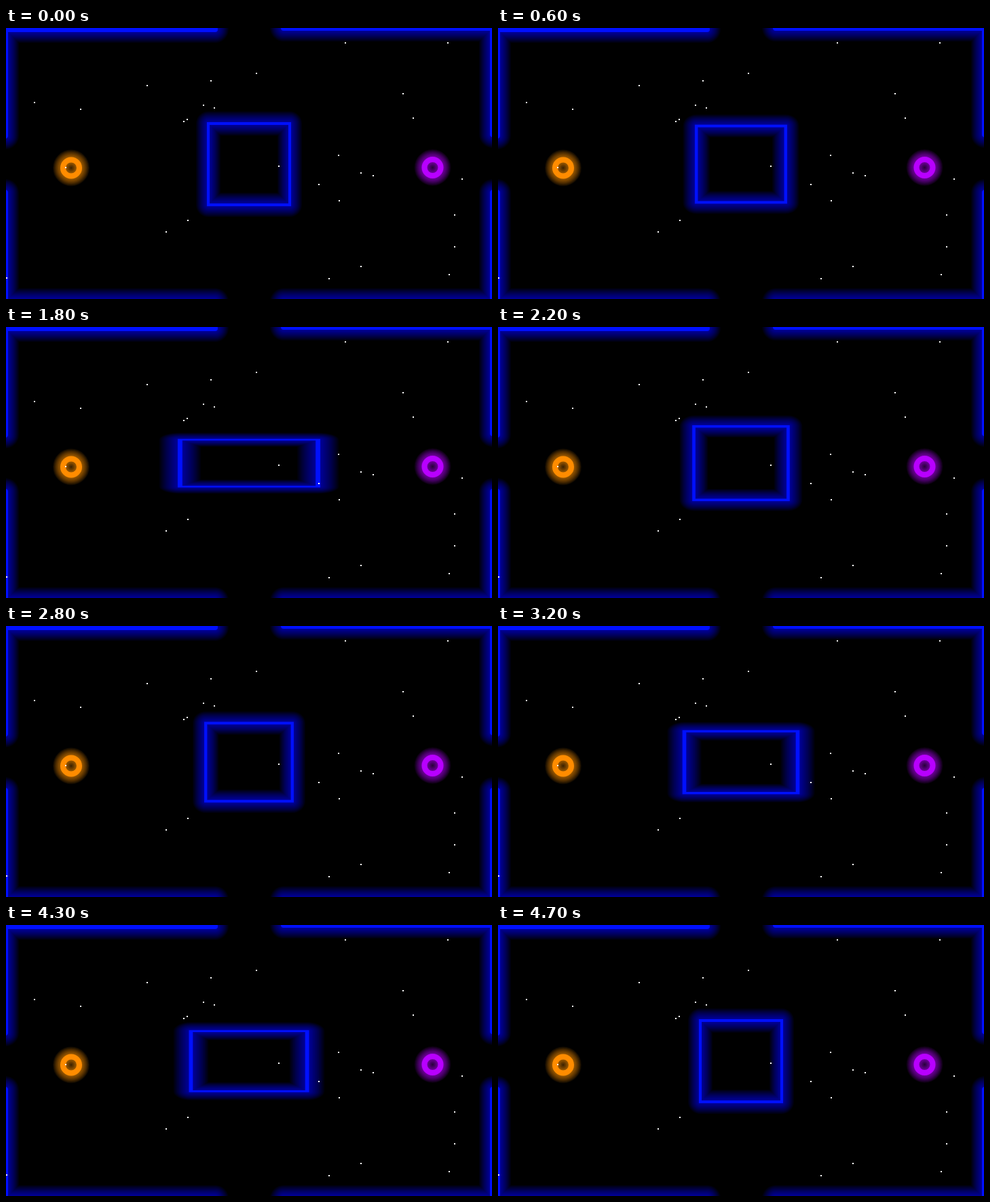
Recreate the animation shown at these times as an HTML page with a canvas. Size 716x400 px, loop 5 s.

```html
<!DOCTYPE html>
<html>
<head>
<meta charset="utf-8">
<style>
html, body { margin: 0; width: 100%; height: 100%; overflow: hidden; background: #000; }
canvas { display: block; }
</style>
</head>
<body>
<canvas id="stage" width="716" height="400"></canvas>
<script>
const W = 716, H = 400, BLUE = '#0010ff';
const ctx = document.getElementById('stage').getContext('2d');

// Strokes a path with a halo built from stacked, ever narrower faint strokes.
function neon(path, color, width, reach) {
  const layers = 16;
  ctx.strokeStyle = color;
  ctx.lineCap = ctx.lineJoin = 'round';
  ctx.globalAlpha = .055;
  for (let i = layers; i > 0; i--) {
    ctx.lineWidth = width + 2 * reach * (i / layers) ** 1.2;
    ctx.stroke(path);
  }
  ctx.globalAlpha = 1;
  ctx.lineJoin = 'miter';
  ctx.lineWidth = width;
  ctx.stroke(path);
}

// One corner of the arena, with arms ending at the gaps.
function corner(x, y, gapX, gapY) {
  const path = new Path2D();
  path.moveTo(gapX, y);
  path.lineTo(x, y);
  path.lineTo(x, gapY);
  neon(path, BLUE, 8, 16);
}

function ring(x, y, color) {
  const path = new Path2D();
  path.arc(x, y, 12, 0, 2 * Math.PI);
  neon(path, color, 8, 11);
}

function box(k) {
  const path = new Path2D();
  path.rect(-60, -60, 120, 120);
  ctx.save();
  ctx.translate(358, 201);
  ctx.scale(1 + .72 * k, 1 - .44 * k);
  neon(path, BLUE, 4, 16);
  ctx.restore();
}

function stars() {
  let seed = 7;
  const random = n => {
    seed = (seed * 16807) % 2147483647;
    return Math.floor(seed / 2147483647 * n);
  };
  ctx.fillStyle = '#fff';
  for (let i = 0; i < 29; i++) ctx.fillRect(random(W), random(H), 2, 2);
}

// Cubic ease with handles (a, 0) and (b, 1), solved by bisection.
function ease(u, a, b) {
  if (u <= 0) return 0;
  if (u >= 1) return 1;
  let lo = 0, hi = 1, s;
  for (let i = 0; i < 20; i++) {
    s = (lo + hi) / 2;
    const x = 3 * s * (1 - s) * ((1 - s) * a + s * b) + s ** 3;
    if (x < u) lo = s; else hi = s;
  }
  return s * s * (3 - 2 * s);
}

// Stretch out, rest, spring back; 0 is the square, 1 the flat box.
const pulse = t => ease((t - 190) / 1240, .6, .6) - ease((t - 1700) / 740, .42, .58);

function draw(now) {
  const t = Math.floor(now % 5000 / 100) * 100;
  ctx.fillStyle = '#000';
  ctx.fillRect(0, 0, W, H);
  corner(-1, 2, 308, 159);
  corner(W + 1, 0, 409, 157);
  corner(-1, H + 4, 308, 243);
  corner(W + 1, H + 4, 409, 243);
  ring(96, 206.5, '#ff8c00');
  ring(628.5, 206, '#b800ff');
  box(pulse(t) + pulse(t - 2270));
  stars();
}

const start = performance.now();
function tick() {
  draw(performance.now() - start);
  requestAnimationFrame(tick);
}
tick();
</script>
</body>
</html>
```
